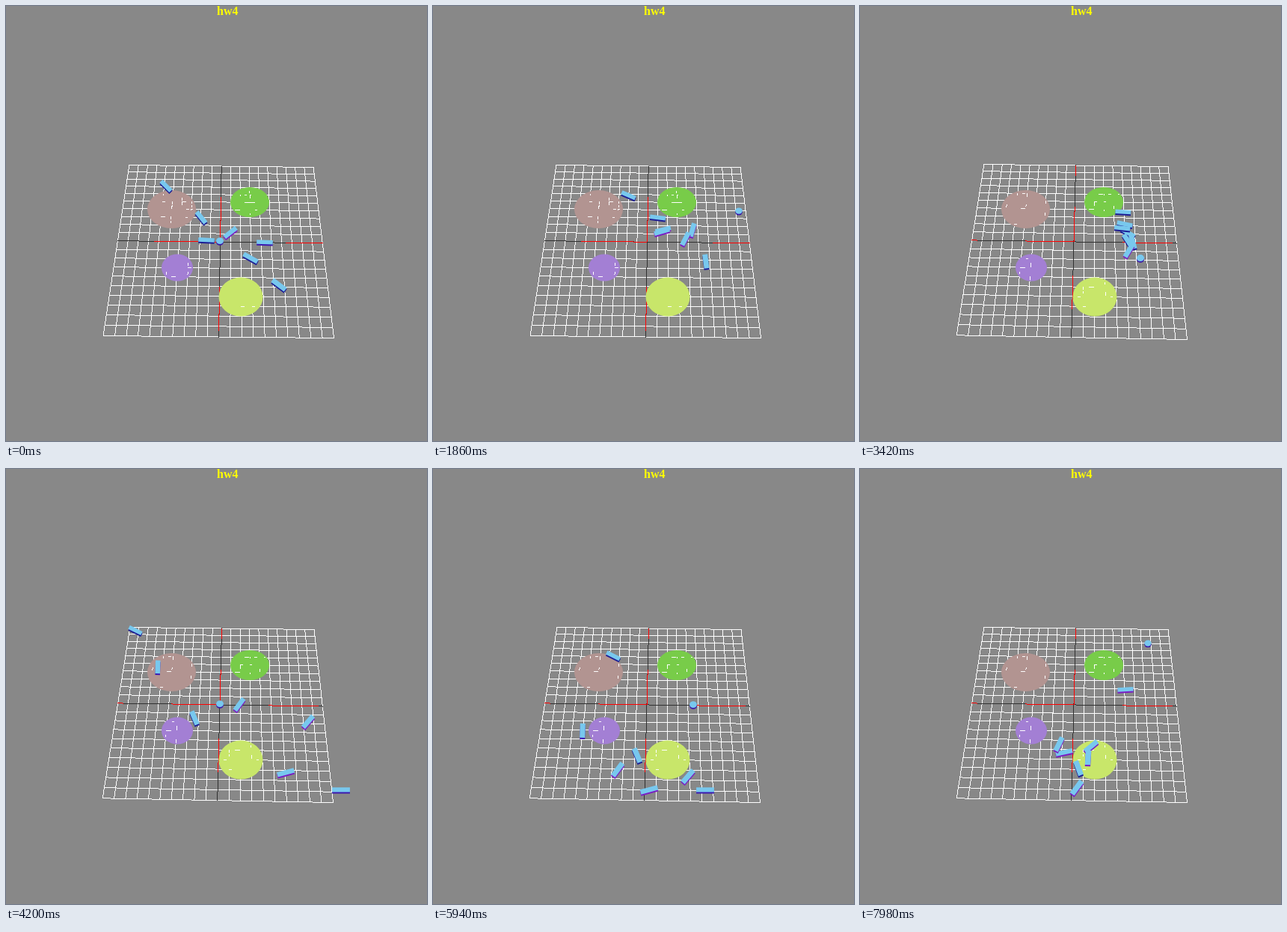
An HTML page with a canvas that plays this animation: 563x581 px, repeating every 8 s.

```html
<!DOCTYPE html>
<html lang="en">
<head>
<meta charset="utf-8">
<title>hw4</title>
<style>
html, body { margin: 0; width: 100%; height: 100%; overflow: hidden; background: #888; }
canvas { display: block; }
</style>
</head>
<body>
<canvas id="stage" width="563" height="581"></canvas>
<script>
const W = 563, H = 581, LOOP = 8000, STEP = 60, CELLS = 20;
const RESET_1 = 300, CAMERA_MOVE = 2100, RESET_2 = 4080;
const ctx = document.getElementById('stage').getContext('2d');

const lerp = (a, b, k) => a + (b - a) * k;
const mix = (p, q, k) => [lerp(p[0], q[0], k), lerp(p[1], q[1], k)];
const ahead = (p, angle, d) => [p[0] + Math.cos(angle) * d, p[1] + Math.sin(angle) * d];

function seeded(seed) {
  return () => {
    seed = (seed * 16807) % 2147483647;
    return seed / 2147483647;
  };
}

// ---------- floor ----------
const discs = [
  { x: 221.5, y: 271.5, rx: 32.5, ry: 25.5, color: '#b29491' },
  { x: 326, y: 262, rx: 26, ry: 20, color: '#78cc49' },
  { x: 229, y: 349.5, rx: 21, ry: 18, color: '#a37fd4' },
  { x: 314, y: 388.5, rx: 29.5, ry: 26, color: '#c8e66a' }
];

// The axes show red only in spans: across by x, down by y.
const views = [
  {
    corners: [[164.4, 212], [410.6, 215], [438, 443], [129.5, 440]],
    across: [[198, 286], [374, 423]],
    down: [[255, 314], [375, 433]],
    seed: 77
  },
  {
    corners: [[165.4, 211], [411.6, 214], [437, 445], [128.7, 439.3]],
    across: [[149, 156], [221, 286], [351, 417]],
    down: [[213, 226], [268, 314], [360, 404]],
    seed: 4021
  }
];

// Perspective map from the unit square to four corners.
function perspective([a, b, c, d]) {
  const dx1 = b[0] - c[0], dy1 = b[1] - c[1];
  const dx2 = d[0] - c[0], dy2 = d[1] - c[1];
  const sx = a[0] - b[0] + c[0] - d[0], sy = a[1] - b[1] + c[1] - d[1];
  const det = dx1 * dy2 - dx2 * dy1;
  const g = (sx * dy2 - dx2 * sy) / det, h = (dx1 * sy - sx * dy1) / det;
  return (u, v) => {
    const w = g * u + h * v + 1;
    return [0, 1].map(i =>
      ((b[i] - a[i] + g * b[i]) * u + (d[i] - a[i] + h * d[i]) * v + a[i]) / w);
  };
}

// Hard-edged one pixel line.
function pixelLine(c, p, q, color) {
  c.fillStyle = color;
  const n = Math.ceil(Math.max(Math.abs(q[0] - p[0]), Math.abs(q[1] - p[1]), 1));
  for (let i = 0; i <= n; i++) {
    const [x, y] = mix(p, q, i / n);
    c.fillRect(Math.round(x), Math.round(y), 1, 1);
  }
}

function drawAxis(c, p, q, axis, spans) {
  const at = s => mix(p, q, (s - p[axis]) / (q[axis] - p[axis]));
  pixelLine(c, p, q, '#303030');
  for (const [s, e] of spans) pixelLine(c, at(s), at(e), '#ff0000');
}

function ellipse(c, x, y, rx, ry, color) {
  c.fillStyle = color;
  c.beginPath();
  c.ellipse(x, y, rx, ry, 0, 0, Math.PI * 2);
  c.fill();
}

const onDisc = ([x, y]) =>
  discs.some(d => ((x - d.x) / d.rx) ** 2 + ((y - d.y) / d.ry) ** 2 < 0.9);

// Stray pieces of grid line that shine through the discs.
function drawStrays(c, map, seed) {
  const random = seeded(seed);
  const half = 0.5 / CELLS;
  for (let i = 1; i < CELLS; i++) {
    for (let j = 0; j < CELLS * 2; j++) {
      const line = i / CELLS, from = j * half;
      const to = from + half * (0.2 + random() * 0.8);
      const ends = random() < 0.5
        ? [map(line, from), map(line, to)]
        : [map(from, line), map(to, line)];
      if (random() < 0.4 && ends.every(onDisc)) pixelLine(c, ...ends, '#ffffff');
    }
  }
}

function makeFloor({ corners, across, down, seed }) {
  const layer = document.createElement('canvas');
  layer.width = W;
  layer.height = H;
  const c = layer.getContext('2d');
  const map = perspective(corners);
  c.fillStyle = '#888888';
  c.fillRect(0, 0, W, H);
  for (let i = 0; i <= CELLS; i++) {
    if (i === CELLS / 2) continue;
    const k = i / CELLS;
    pixelLine(c, map(k, 0), map(k, 1), '#ffffff');
    pixelLine(c, map(0, k), map(1, k), '#ffffff');
  }
  drawAxis(c, map(0, 0.5), map(1, 0.5), 0, across);
  drawAxis(c, map(0.5, 0), map(0.5, 1), 1, down);
  for (const d of discs) ellipse(c, d.x, d.y, d.rx, d.ry, d.color);
  drawStrays(c, map, seed);
  c.fillStyle = '#ffff00';
  c.font = 'bold 16px "Liberation Serif", serif';
  c.fillText('hw4', 282, 12);
  return layer;
}

const floors = views.map(makeFloor);

// ---------- flock ----------
// Each rod has one waypoint and heading for gathering,
// then a launch, a turning point and an end for scattering.
const rods = [
  { via: [224, 237], heading: 25, trip: [[173, 216], [241, 250], [355, 295]] },
  { via: [271, 279], heading: 10, trip: [[203, 265], [200, 350], [273, 379]] },
  { via: [310, 299], heading: 168, trip: [[252, 333], [273, 383], [266, 368]] },
  { via: [278, 309], heading: -12, trip: [[312, 315], [247, 402], [309, 371]] },
  { via: [356, 312], heading: 215, trip: [[374, 406], [289, 429], [290, 426]] },
  { via: [337, 333], heading: 250, trip: [[404, 338], [341, 411], [305, 386]] },
  { via: [375, 369], heading: 232, trip: [[448, 429], [364, 429], [292, 400]] }
];
const centre = [286, 314], focus = [362, 288], meeting = [372, 322];

// Before the first reset: the waypoints a moment earlier, drawn to the centre.
function drift({ via }, t) {
  return mix([via[0] - 10, via[1] + 4], centre, t / 1250);
}

// From the corners past the waypoint, curving in and circling the meeting place.
function gather({ via, heading }, t) {
  const angle = heading * Math.PI / 180;
  if (t < 1080) return ahead(via, angle, (t - 1080) * 0.08);
  const near = [(via[0] - focus[0]) * 0.3, (via[1] - focus[1]) * 0.2];
  if (t < 2580) {
    const k = (t - 1080) / 1500;
    const bend = ahead(via, angle, 25);
    const end = [focus[0] + near[0], focus[1] + near[1]];
    return mix(mix(via, bend, k), mix(bend, end, k), k);
  }
  const k = (t - 2580) / 1500, spin = k * 1.6;
  const [x, y] = mix(focus, meeting, Math.sin(k * Math.PI / 2));
  return [
    x + near[0] * Math.cos(spin) - near[1] * Math.sin(spin),
    y + near[0] * Math.sin(spin) + near[1] * Math.cos(spin)
  ];
}

// Straight to the turning point, then a shared dip on the way to the end.
function scatter({ trip: [launch, turn, end] }, t) {
  if (t <= 5940) return mix(launch, turn, (t - 4200) / 1740);
  const k = (t - 5940) / 2040, bow = Math.sin(k * Math.PI);
  const [x, y] = mix(turn, end, k);
  return [x - 13 * bow, y + 17 * bow];
}

const moveAt = t => t < RESET_1 ? drift : t < RESET_2 ? gather : scatter;

// The rod points the way it has just come.
function poseOf(rod, t) {
  const move = moveAt(t);
  const [x, y] = move(rod, t), [px, py] = move(rod, t - 20);
  return [x, y, Math.atan2(y - py, x - px)];
}

const depthScale = y => 0.9 + (y - 213) * 0.00098;

function drawRod([x, y, angle]) {
  const s = depthScale(y), steep = Math.abs(Math.sin(angle));
  const len = 21.5 * s * Math.sqrt(1 - 0.28 * steep ** 2);
  const wide = (5.6 + 1.2 * steep) * s;
  const slab = (dy, color) => {
    ctx.save();
    ctx.translate(x, y + dy);
    ctx.rotate(angle);
    ctx.fillStyle = color;
    ctx.fillRect(-len / 2, -wide / 2, len, wide);
    ctx.restore();
  };
  const lean = Math.sin(2 * angle);
  slab(1.4, lean < -0.1 ? '#7a1cc4' : lean > 0.1 ? '#1c1c94' : '#3c18b0');
  slab(-0.6, '#78c8ee');
}

// ---------- goal ----------
const goals = [
  { from: 0, at: centre },
  { from: 780, at: [409, 274] },
  { from: CAMERA_MOVE, at: [375, 337] },
  { from: RESET_2, at: centre },
  { from: 5040, at: [348, 315] },
  { from: 7200, at: [385, 233] }
];

function drawGoal([x, y]) {
  const r = 5 * depthScale(y);
  ellipse(ctx, x, y + 1.3, r, r * 0.88, '#3c18a8');
  ellipse(ctx, x, y - 0.4, r, r * 0.88, '#78c8ee');
}

function draw(now) {
  const t = Math.floor(now % LOOP / STEP) * STEP;
  ctx.drawImage(floors[t < CAMERA_MOVE ? 0 : 1], 0, 0);
  for (const rod of rods) drawRod(poseOf(rod, t));
  drawGoal(goals.filter(g => g.from <= t).pop().at);
}

const start = performance.now();
function frame() {
  draw(performance.now() - start);
  requestAnimationFrame(frame);
}
frame();
</script>
</body>
</html>
```
